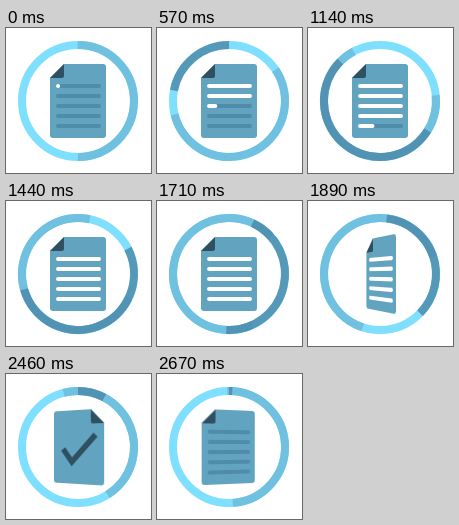
An HTML page for the animation above (2.7 s loop, 145 by 145 pixels).

```html
<!DOCTYPE html>
<html lang="en">
<head>
<meta charset="utf-8">
<title>Document check</title>
<style>
  html, body { margin: 0; width: 100%; height: 100%; overflow: hidden; background: #fff; }
  svg { position: absolute; left: 0; top: 0; width: 145px; height: 145px; }
  #sheet { transform-origin: 72px 73px; }
</style>
</head>
<body>
<svg viewBox="0 0 145 145" fill="none" stroke-width="8">
  <circle cx="72" cy="73" r="56" stroke="#7fdfff"/>
  <path id="mid" stroke="#70c0e0"/>
  <path id="dark" stroke="#4a86a6" stroke-opacity=".78"/>
</svg>
<svg id="sheet" viewBox="0 0 145 145" fill="none" stroke-linecap="round">
  <path fill="#62a4bf" d="M58 36H97a3 3 0 0 1 3 3V107a3 3 0 0 1-3 3H47a3 3 0 0 1-3-3V50Z"/>
  <path fill="#2f5060" d="M58 36V47.5a2.5 2.5 0 0 1-2.5 2.5H44Z"/>
  <g id="front" stroke-width="4"></g>
  <path id="back" stroke="#2f5060" stroke-width="6" stroke-linecap="butt"
        transform="matrix(-1 0 0 1 144 0)" d="M55 75L65 88L91 61"/>
</svg>
<script>
const LOOP = 2700, ROWS = 5, WRITE = 1325, FLIP = 280;
const $ = id => document.getElementById(id);
const clamp = v => Math.max(0, Math.min(1, v));

// Monotone curve through [time, angle] points
function curve(pts) {
  const n = pts.length - 1;
  const rate = i => (pts[i + 1][1] - pts[i][1]) / (pts[i + 1][0] - pts[i][0]);
  const slope = pts.map((p, i) => {
    if (i === 0) return rate(0);
    if (i === n) return rate(n - 1);
    const a = rate(i - 1), b = rate(i);
    return a * b > 0 ? 2 * a * b / (a + b) : 0;
  });
  return t => {
    let i = 0;
    while (i < n - 1 && t > pts[i + 1][0]) i++;
    const [t0, a] = pts[i], [t1, b] = pts[i + 1], h = t1 - t0;
    const u = (t - t0) / h, v = 1 - u;
    return a * (1 + 2 * u) * v * v + slope[i] * h * u * v * v
         + b * u * u * (3 - 2 * u) - slope[i + 1] * h * u * u * v;
  };
}

const midStart = curve([[0, 0], [570, 56], [1110, 82], [1710, 155], [2040, 237], [2160, 262], [2460, 345], [2700, 360]]);
const darkStart = curve([[0, 360], [570, 281], [1140, 122], [1710, 25], [2040, 0], [2700, 0]]);
const darkEnd = curve([[0, 360], [570, 360], [1140, 315], [1710, 183], [2040, 95], [2160, 68], [2460, 28], [2700, 0]]);

function point(deg) {
  const a = deg * Math.PI / 180;
  return (72 + 56 * Math.sin(a)).toFixed(3) + " " + (73 - 56 * Math.cos(a)).toFixed(3);
}

function arc(from, to) {
  if (to - from < 0.1) return "";
  return `M${point(from)}A56 56 0 ${to - from > 180 ? 1 : 0} 1 ${point(to)}`;
}

function addRow(y, color) {
  const row = document.createElementNS("http://www.w3.org/2000/svg", "path");
  row.setAttribute("stroke", color);
  row.setAttribute("d", `M52 ${y}H93`);
  $("front").append(row);
  return row;
}

const rows = Array.from({ length: ROWS }, (_, i) => {
  const y = 58 + 10 * i;
  addRow(y, "#4e8ca9");
  return { y, ink: addRow(y, "#fff") };
});

function draw(t) {
  $("mid").setAttribute("d", arc(midStart(t), 180 + 360 * t / LOOP));
  $("dark").setAttribute("d", arc(darkStart(t), darkEnd(t)));

  const turn = 180 * (clamp((t - 1800) / FLIP) + clamp((t - LOOP + FLIP) / FLIP));
  const facing = Math.cos(turn * Math.PI / 180) > 0;
  $("sheet").style.transform = turn ? `perspective(300px) rotateY(${-turn}deg)` : "none";
  $("front").style.display = facing ? "" : "none";
  $("back").style.display = facing ? "none" : "";

  const written = turn < 180 ? t / WRITE * ROWS : 0;
  rows.forEach(({ y, ink }, i) => {
    const part = clamp(written - i);
    ink.style.display = part ? "" : "none";
    ink.setAttribute("d", `M52 ${y}H${52 + 41 * part}`);
  });
}

const began = performance.now();
function tick() {
  draw((performance.now() - began) % LOOP);
  requestAnimationFrame(tick);
}
draw(0);
requestAnimationFrame(tick);
</script>
</body>
</html>
```
